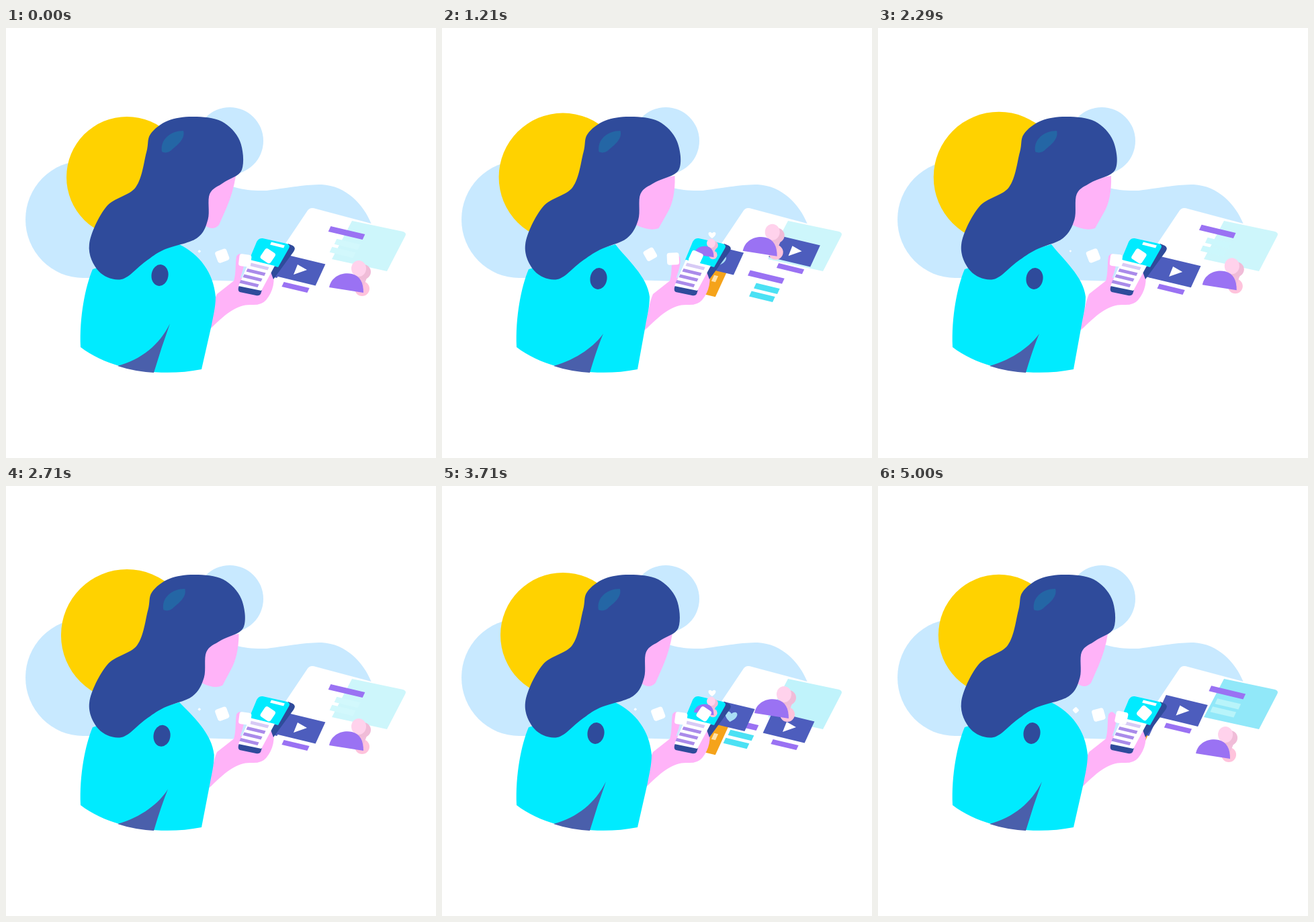
Recreate the animation shown at these times as an HTML page with a canvas. Size 640 px wide and 640 px high, loop 5070 ms.

```html
<!DOCTYPE html>
<html lang="en">
<head>
<meta charset="utf-8">
<title>Reading on a phone</title>
<style>
html, body { margin: 0; width: 100%; height: 100%; overflow: hidden; background: #fff; }
canvas { display: block; width: 100vw; height: 100vh; object-fit: contain; }
</style>
</head>
<body>
<canvas id="stage" width="640" height="640"></canvas>
<script>
const c = document.getElementById('stage').getContext('2d');
const LOOP = 5070, PULSE = LOOP / 3, STEP = 925, FIRST = 160;
const NAVY = '#2f4b9b', SKY = '#c8e9ff', PINK = '#ffb3f8', CYAN = '#00ebff',
  PURPLE = '#9a72f3', TILE = '#4d5dbd';

const lerp = (a, b, k) => a + (b - a) * k;
const clamp = x => Math.max(0, Math.min(1, x));
const smooth = (a, b, t) => { const x = clamp((t - a) / (b - a)); return x * x * (3 - 2 * x); };
const mixColor = (a, b, k) => `rgb(${a.map((v, i) => Math.round(lerp(v, b[i], k)))})`;
const pulse = t => (1 - Math.cos(t * Math.PI * 2 / PULSE)) / 2;

function shape(path, color) {
  c.fillStyle = color;
  c.fill(new Path2D(path));
}

// Smooth closed curve through a few points.
function blob(points, color) {
  const n = points.length, at = i => points[(i + n) % n];
  c.fillStyle = color;
  c.beginPath();
  c.moveTo(...points[0]);
  for (let i = 0; i < n; i++) {
    const [p, q, r, s] = [at(i - 1), at(i), at(i + 1), at(i + 2)];
    c.bezierCurveTo(q[0] + (r[0] - p[0]) / 6, q[1] + (r[1] - p[1]) / 6,
      r[0] - (s[0] - q[0]) / 6, r[1] - (s[1] - q[1]) / 6, r[0], r[1]);
  }
  c.fill();
}

function oval(x, y, rx, ry, color, turn = 0) {
  c.fillStyle = color;
  c.beginPath();
  c.ellipse(x, y, rx, ry, turn, 0, Math.PI * 2);
  c.fill();
}

function placed(x, y, draw) {
  c.save();
  c.translate(x, y);
  draw();
  c.restore();
}

// A box in the tilted plane shared by the cards and the phone.
function bar(x, y, w, h, color) {
  placed(x, y, () => {
    c.transform(1, .24, -.46, 1, 0, 0);
    c.fillStyle = color;
    c.fillRect(-w / 2, -h / 2, w, h);
  });
}

function heart(s, color) {
  c.fillStyle = color;
  c.beginPath();
  c.moveTo(0, s);
  c.bezierCurveTo(-s * 2, -s * .3, -s * .8, -s * 1.5, 0, -s * .5);
  c.bezierCurveTo(s * .8, -s * 1.5, s * 2, -s * .3, 0, s);
  c.fill();
}

function avatar(x, y, s) {
  placed(x, y, () => {
    c.scale(s, s);
    oval(23, 10, 11, 11, '#ffc3dc');
    shape('M15 -23H26L33 -13L24 9L12 7Z', '#f3bddb');
    oval(25, -15, 11, 11, '#f0bcd8');
    oval(18, -20, 11, 12, '#ffd2ec');
    shape('M-26 8C-23 -8 -7 -15 8 -12C20 -9 25 1 25 16Z', PURPLE);
  });
}

// Each step runs a little past its stop, then settles back.
function poseAt(t) {
  const k = Math.floor((t - FIRST) / STEP), age = t - FIRST - k * STEP;
  const rise = 1.1 * (1 - Math.cos(Math.PI * clamp(age / 330))) / 2;
  return k + 3 + rise - .1 * smooth(360, 560, age);
}

// Stops at left, right and top, with a bend after each.
const RING = [[436, 361], [499, 398], [515, 360], [538, 314], [499, 312], [478, 285]];

function onRing(pose) {
  const leg = Math.floor(pose), k = pose - leg, m = 1 - k;
  const [a, q, b] = [0, 1, 2].map(j => RING[(leg * 2 + j) % 6]);
  return [0, 1].map(i => m * m * a[i] + 2 * m * k * q[i] + k * k * b[i]);
}

function background(t) {
  oval(115, 285, 86, 87, SKY);
  oval(333, 168, 50, 50, SKY);
  shape('M115 372V200L300 220C335 238 355 243 388 242C425 237 445 233 470 233C506 235 532 262 544 292L500 378C330 380 240 370 115 372Z', SKY);
  const r = 90 + 9 * pulse(t);
  oval(180, 222, r, r, '#ffd200');
  shape('M448 273Q452 266 461 269L596 305L536 424L364 398Z', '#fff');
  const mint = mixColor([205, 246, 251], [145, 232, 249], smooth(3500, 4200, t));
  shape('M515 287L591 303Q597 305 594 310L567 362L485 344Z', mint);
}

function tiles(pose) {
  const phase = pose % 3, near = 1 - Math.abs(phase - 1);
  const [vx, vy] = onRing(pose), [ax, ay] = onRing(pose + 1), [tx, ty] = onRing(pose + 2);

  // Two tiles slide out from under the phone and back.
  const orange = clamp(1.5 - Math.abs(phase - 1.5)), ox = 385 + 18 * orange, oy = 365 + 11 * orange;
  bar(ox, oy, 27, 42, '#f5a31a');
  bar(ox + 3, oy - 3, 6, 9, '#ffe2a8');

  const line = mixColor([75, 225, 244], [210, 248, 252], clamp(1 - Math.min(phase, 3 - phase)));
  bar(tx + 8, ty - 7, 51, 8, PURPLE);
  bar(tx + 9, ty + 10, 35, 8, line);
  bar(tx + 2, ty + 22, 35, 8, line);

  const hx = 388 + 47 * clamp(near), hy = 350 - 7 * clamp(near);
  bar(hx, hy, 46, 33, TILE);
  placed(hx - 5, hy, () => {
    c.transform(1, .15, -.2, 1, 0, 0);
    heart(8, '#a9ddf5');
  });

  bar(vx + 1, vy - 1, 62, 32, TILE);
  placed(vx + 1, vy - 1, () => shape('M-3 -8L11 0L-9 7Z', '#fff'));
  bar(vx - 5, vy + 25, 38, 7, PURPLE);
  avatar(ax - 8, ay + 18, 1);
}

function phone(pose) {
  shape('M301 450C307 422 309 408 314 396L342 374L397 359C401 376 398 392 387 405Q380 413 365 412C346 411 329 423 306 446Z', PINK);
  shape('M420 321L427 324Q432 327 428 333L398 374L392 358Z', NAVY);
  shape('M347 383L381 390L379 396Q377 399 372 398L348 393Q344 391 347 383Z', NAVY);
  shape('M382 313L418 321Q424 323 421 328L405 356L362 345L372 321Q375 312 382 313Z', CYAN);
  const stop = Math.round(pose) % 3;
  if (stop === 1) {
    avatar(390, 332, .58);
    placed(402, 308, () => heart(5, '#fff'));
  } else {
    bar(404, 323, 20, 4, stop ? PURPLE : '#fff');
    bar(385, 344, 24, 4, stop ? PURPLE : CYAN);
  }
  shape('M363 345L400 354L380 391L346 384Z', '#fff');
  for (let i = 0; i < 4; i++) bar(377 - i * 5, 355 + i * 8.5, 27, 4.5, i ? '#aa8bea' : '#d7caf5');
  shape('M339 377C343 362 341 349 343 340Q348 332 354 341C357 352 350 366 346 381Z', PINK);
}

// Chips leave the screen and shrink as they near the face.
function diamonds(pose) {
  const drift = (pose + .33) % 1;
  for (let i = -1; i < 4; i++) {
    const x = 333 + 34 * (i - drift);
    const size = Math.min(18, (x - 282) * .6) * clamp((408 - x) / 8);
    if (size <= 0) continue;
    placed(x, 346 - Math.abs(x - 356) * .2, () => {
      c.rotate((-20 + (x - 322) * .8) * Math.PI / 180);
      c.fillStyle = '#fff';
      c.beginPath();
      c.roundRect(-size / 2, -size / 2, size, size, size / 5);
      c.fill();
    });
  }
}

const HAIR = [[210, 185], [216, 158], [242, 138], [280, 132], [322, 139], [349, 168], [352, 211], [325, 230], [304, 247],
  [301, 285], [284, 313], [235, 330], [207, 348], [172, 374], [138, 362], [124, 322], [150, 266], [194, 237]];

function person(t) {
  const k = smooth(600, 1150, t) - smooth(2550, 3050, t);
  const sway = 2.5 * pulse(t) - 1, edge = 312 - 3 * k;
  shape(`M111 475C109 430 118 385 129 359L258 322C${288 - 14 * k} ${337 + 6 * k} ${edge - 3} ${364 + 6 * k} ${edge} 400
    C${edge} 416 ${edge - 4} 430 ${edge - 6} 442L291 508C230 520 157 510 111 475Z`, CYAN);
  shape(`M166 503C202 493 228 472 ${244 - 4 * k} ${440 + 15 * k}Q231 476 220 513Q190 511 166 503Z`, '#4a5fab');
  oval(229 + 4 * k, 368 + 5 * k, 12.5, 16, NAVY, .15);

  c.save();
  c.translate(sway, 0);
  shape(`M290 230L${343 + 3 * k} 220Q${339 + 8 * k} ${245 + 10 * k} ${329 + 6 * k} ${268 + 7 * k}
    L${318 + 4 * k} ${293 + 5 * k}Q309 303 ${296 - 8 * k} 293Z`, PINK);
  c.restore();

  // Turning draws the front locks back from the face.
  const hair = HAIR.map(([x, y]) => [
    x + sway * clamp((330 - y) / 100) - (x > 250 && y > 225 ? 9 * k : 0), y]);
  blob(hair, NAVY);
  placed(sway, 0, () => shape('M265 153C246 153 230 166 233 184C238 187 245 185 249 180C258 173 268 164 265 153Z', '#2466a5'));
}

function frame(now) {
  const t = now % LOOP, pose = poseAt(t);
  c.fillStyle = '#fff';
  c.fillRect(0, 0, 640, 640);
  background(t);
  tiles(pose);
  phone(pose);
  diamonds(pose);
  person(t);
}

const start = performance.now();
function tick() {
  frame(performance.now() - start);
  requestAnimationFrame(tick);
}
tick();
</script>
</body>
</html>
```
